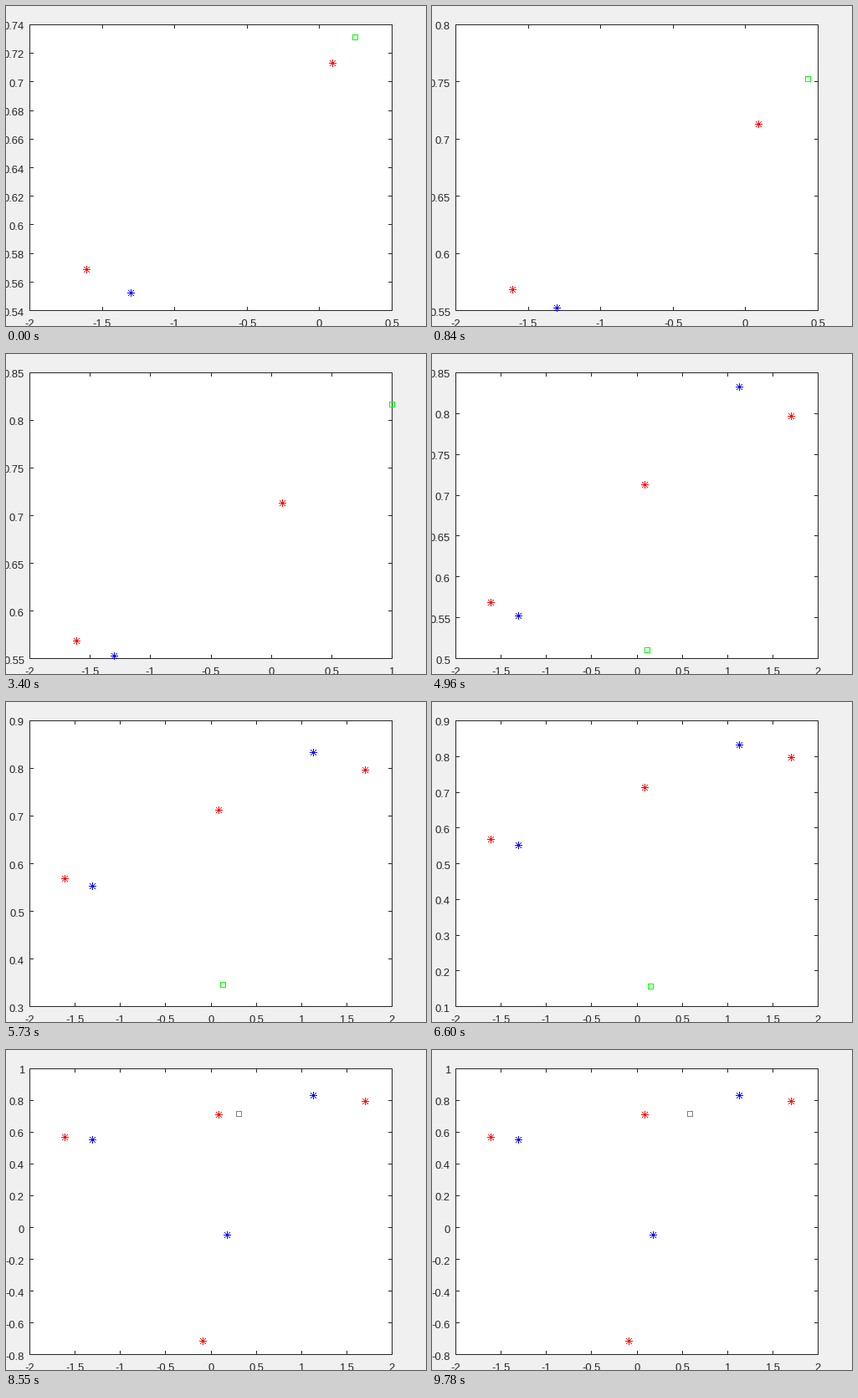
A matplotlib script for the animation above (9.86 s loop, 502 px wide and 383 px high).

```python
import math

import matplotlib.pyplot as plt
import numpy as np
from matplotlib.animation import FuncAnimation
from matplotlib.collections import LineCollection

WIDTH, HEIGHT, DPI = 502, 383, 64
FRAMES, INTERVAL = 290, 34
LEFT, RIGHT, TOP, BOTTOM = 28, 461, 22, 364
PIXEL = 72 / DPI
INK, RED, BLUE, GREEN, GREY = "#262626", "#ff0000", "#0000ff", "#00ff00", "#808080"

TIMES = [0, 70, 1070, 2060, 3080, 4100, 5110, 6130, 6970, 7990, 8220, 9250, 9780, 9860]
STEPS = [0, 1, 14, 27, 40, 53, 66, 79, 90, 103, 106, 119, 126, 127]

# Stars: step after which each is shown, x, y, colour.
STARS = [
    (-1, -1.6100, 0.5685, RED),
    (-1, -1.3035, 0.5525, BLUE),
    (-1, 0.0900, 0.7130, RED),
    (52, 1.1310, 0.8325, BLUE),
    (52, 1.7040, 0.7965, RED),
    (97, 0.1800, -0.0495, BLUE),
    (97, -0.0880, -0.7150, RED),
]

# Rays: last step, start, end, steps and fractions along the way, colour.
RAYS = [
    (52, (0.246, 0.731), (1.130, 0.832), [0, 24, 44, 52], [0, 0.46, 0.85, 1], GREEN),
    (97, (0.090, 0.713), (0.180, -0.0495), [52, 64, 74, 97], [0, 0.266, 0.482, 1], GREEN),
    (126, (0.090, 0.7135), (0.587, 0.7135), [97, 126], [0, 1], GREY),
]


def probe(step):
    for last, start, end, keys, parts, color in RAYS:
        if step <= last:
            break
    part = np.interp(step, keys, parts)
    x, y = (a + part * (b - a) for a, b in zip(start, end))
    return x, y, color


def nice_ticks(values):
    """Ticks at the finest 1-2-5 step that needs at most ten intervals."""
    low, high = min(values), max(values)
    for power in range(-3, 2):
        for base in (1, 2, 5):
            size = base * 10.0**power
            first = math.floor(low / size + 1e-9)
            last = math.ceil(high / size - 1e-9)
            if last - first <= 10:
                return [round(n * size, 6) for n in range(first, last + 1)]


def scaler(ticks, begin, end):
    low, high = ticks[0], ticks[-1]
    return lambda v: math.floor(begin + (v - low) / (high - low) * (end - begin) + 0.5)


def hline(x0, x1, y):
    return [(x0, y + 0.5), (x1 + 1, y + 0.5)]


def vline(x, y0, y1):
    return [(x + 0.5, y0), (x + 0.5, y1 + 1)]


def box(x0, y0, x1, y1):
    return [hline(x0, x1, y0), hline(x0, x1, y1), vline(x0, y0, y1), vline(x1, y0, y1)]


def star(x, y):
    lines = [hline(x - 4, x + 4, y), vline(x, y - 4, y + 4)]
    for d in range(-3, 4):
        lines += [hline(x + d, x + d, y + d), hline(x + d, x + d, y - d)]
    return lines


def label(x, y, value, align):
    ax.text(x, y, f"{value:g}", ha=align, va="baseline", color=INK,
            family="Liberation Sans", size=13 * PIXEL)


fig = plt.figure(figsize=(WIDTH / DPI, HEIGHT / DPI), dpi=DPI, facecolor="#f0f0f0")
ax = fig.add_axes([0, 0, 1, 1])
ax.set_xlim(0, WIDTH)
ax.set_ylim(HEIGHT, 0)
ax.axis("off")
ax.add_patch(plt.Rectangle((LEFT, TOP), RIGHT - LEFT + 1, BOTTOM - TOP + 1,
                           facecolor="white", linewidth=0))
# All strokes lie on whole pixels already, so snapping would shift them.
strokes = LineCollection([], linewidths=PIXEL, capstyle="butt", snap=False)
ax.add_collection(strokes, autolim=False)


def draw(frame):
    step = int(np.interp((frame + 1) * INTERVAL, TIMES, STEPS))
    px, py, color = probe(step)
    stars = [s[1:] for s in STARS if step > s[0]]
    xticks = nice_ticks([px] + [s[0] for s in stars])
    yticks = nice_ticks([py] + [s[1] for s in stars])
    to_x, to_y = scaler(xticks, LEFT, RIGHT), scaler(yticks, BOTTOM, TOP)
    to_baseline = scaler(yticks, BOTTOM + 7, TOP + 6)

    for text in list(ax.texts):
        text.remove()
    lines = box(LEFT, TOP, RIGHT, BOTTOM)
    for value in xticks:
        x = to_x(value)
        lines += [vline(x, TOP, TOP + 4), vline(x, BOTTOM - 4, BOTTOM)]
        label(x, 384, value, "center")
    for value in yticks:
        y = to_y(value)
        lines += [hline(LEFT, LEFT + 4, y), hline(RIGHT - 4, RIGHT, y)]
        label(22, to_baseline(value), value, "right")
    colors = [INK] * len(lines)

    for x, y, shade in stars:
        marks = star(to_x(x), to_y(y))
        lines += marks
        colors += [shade] * len(marks)
    x, y = to_x(px), to_y(py)
    lines += box(x - 3, y - 3, x + 3, y + 3)
    colors += [color] * 4

    strokes.set_segments(lines)
    strokes.set_color(colors)
    return [strokes, *ax.texts]


anim = FuncAnimation(fig, draw, frames=FRAMES, interval=INTERVAL,
                     init_func=lambda: draw(0), repeat=True, repeat_delay=0)
plt.show()
```
